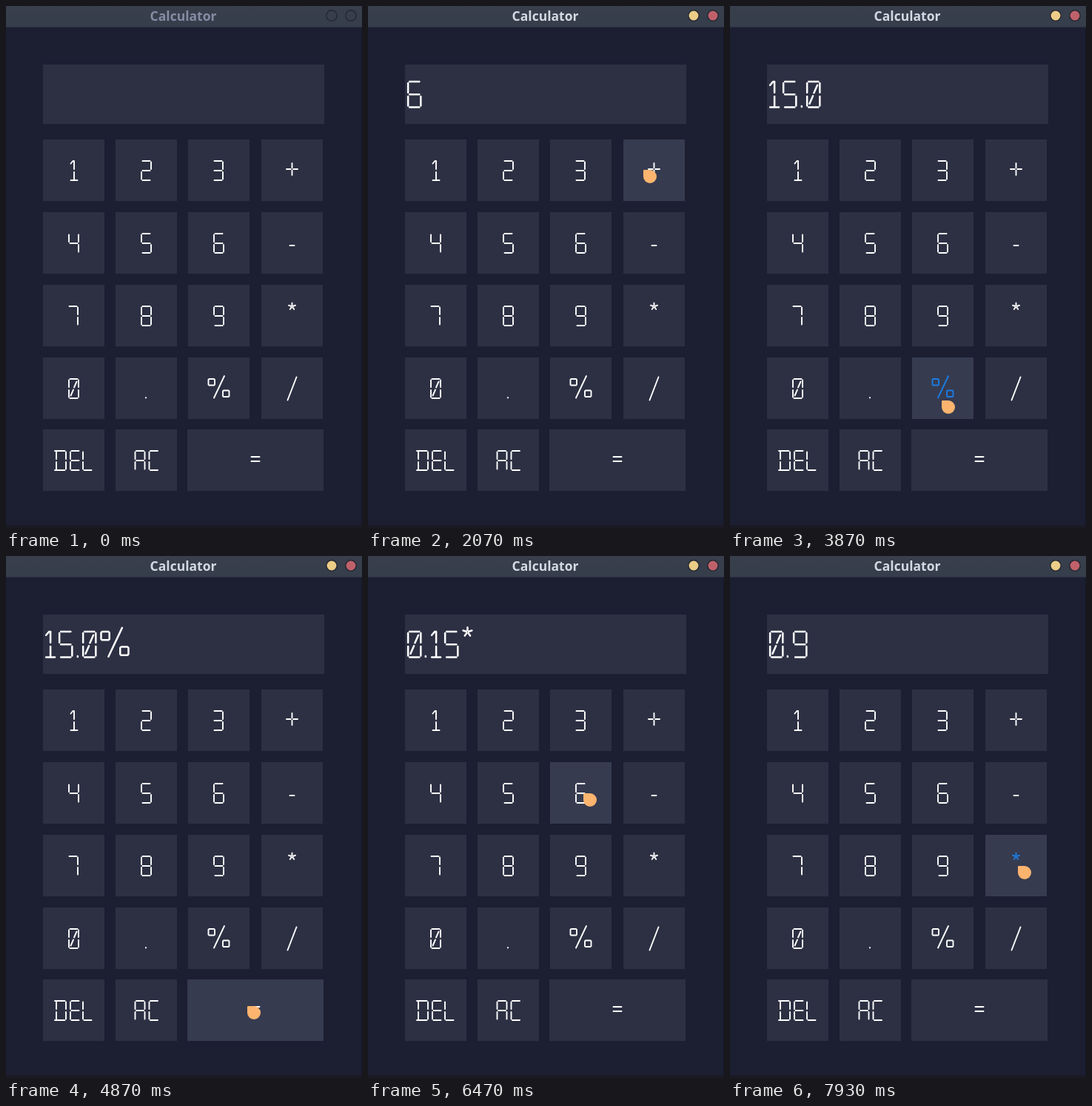
These frames come from a looping animation (481x704 px, 8000 ms). An HTML page with a canvas:

```html
<!DOCTYPE html>
<html lang="en">
<head>
<meta charset="utf-8">
<title>Calculator</title>
<style>
  html, body { margin: 0; width: 481px; height: 704px; overflow: hidden; background: #1c1e32; }
  canvas { display: block; }
</style>
</head>
<body>
<canvas id="stage" width="481" height="704"></canvas>
<script>
const ctx = document.getElementById('stage').getContext('2d');
const LOOP = 8000, FPS = 15;
const KEY_SIZE = 83, DISPLAY_SCALE = 1.32;

// Glyphs are centre lines on a cell 28 units high, x measured from the pen.
const SEGMENTS = {
  a: 'M4.5 1H14.5', b: 'M16 2.5V12', c: 'M16 16V25.5', d: 'M4.5 27H14.5',
  e: 'M3 16V25.5', f: 'M3 2.5V12', g: 'M4.5 14H14.5'
};
const glyphs = {};
function addGlyph(ch, advance, path, shift = 0) {
  const shifted = new Path2D();
  shifted.addPath(new Path2D(path), new DOMMatrix().translate(shift, 0));
  glyphs[ch] = { advance, path: shifted };
}
const segmented = {
  0: 'abcdef', 2: 'abged', 3: 'abgcd', 4: 'fgbc', 5: 'afgcd', 6: 'afgcde', 7: 'abc',
  8: 'abcdefg', 9: 'abcdfg', D: 'abcdef', E: 'adefg', L: 'def', A: 'abcefg', C: 'adef'
};
const extras = { 0: 'M5.5 23.5L9 15.5M10 12.5L13.5 4.5', D: 'M1 1H4.5M1 27H4.5' };
for (const [ch, parts] of Object.entries(segmented)) {
  // A glyph with one open side has a narrower cell.
  const openLeft = '37'.includes(ch), openRight = 'ELC'.includes(ch);
  const path = [...parts].map(p => SEGMENTS[p]).join('') + (extras[ch] || '');
  addGlyph(ch, openLeft || openRight ? 17 : 19, path, openLeft ? -2 : 0);
}
const arms = [0, 1, 2, 3, 4].map(i => {
  const s = Math.sin(i * Math.PI * 0.4), c = Math.cos(i * Math.PI * 0.4);
  return `M${7 + 1.4 * s} ${1.2 - 1.4 * c}L${7 + 4.7 * s} ${1.2 - 4.7 * c}`;
}).join('');
const ring = (x, y) => `M${x + 1} ${y}h6.5l1 1v6.5l-1 1h-6.5l-1 -1v-6.5z`;
addGlyph('1', 14, 'M3 4.5L6 1H7.5V12M7.5 16V27M3 27H12');
addGlyph('.', 5, 'M2 26V26.6');
addGlyph('+', 19, 'M2 12H7.8M11.2 12H17M9.5 4V10.3M9.5 13.7V20');
addGlyph('-', 10, 'M2 17H8');
addGlyph('*', 14, arms);
addGlyph('/', 17, 'M2.5 29.5L14.5 -1.5');
addGlyph('=', 17, 'M3 9H14M3 15H14');
addGlyph('%', 33, ring(2.5, 1) + ring(22, 16.5) + 'M10 26.5L24 -3');

const keys = ['123+', '456-', '789*', '0.%/'].map(row => [...row])
  .concat([['DEL', 'AC', '=']])
  .flatMap((row, r) => row.map((label, c) => ({
    label, x: Math.round(50 + 98.2 * c), y: Math.round(180 + 97.85 * r), w: KEY_SIZE
  })));
Object.assign(keys.find(k => k.label === '='), { x: 245, w: 184 });

// Pointer stops in ticks of 1/15 s: place, press, release, readout update.
const TRAVEL = 6;
const stop = (x, y, press, key = '', release = press, shown = press) =>
  ({ x, y, press, key, release, shown });
const stops = [
  stop(448, 212, 4),
  stop(290, 316, 14),
  stop(295, 301, 17, '6', 21, 24),
  stop(372, 221, 26, '+', 31, 33),
  stop(290, 425, 38, '9', 40, 41),
  stop(300, 594, 44, '=', 49, 50),
  stop(326, 611, 52),
  stop(286, 532, 58, '%', 67, 68),
  stop(326, 607, 72, '=', 73, 75),
  stop(384, 422, 85, '*', 88, 90),
  stop(291, 320, 95, '6', 97, 98),
  stop(330, 695, 104),
  stop(332, 612, 110, '=', 112, 113),
  stop(389, 418, 119, '*', 121, 122)
];
stops.forEach((s, i) => s.depart = i ? Math.max(stops[i - 1].shown, s.press - TRAVEL) : s.press);

function pointerAt(tick) {
  const i = stops.filter(s => s.depart <= tick).length - 1;
  if (i < 0) return null;
  const to = stops[i], from = stops[i - 1] || to;
  const k = Math.min(1, (tick - to.depart) / Math.max(1, to.press - 1 - to.depart));
  const eased = 1 - (1 - k) ** 2;
  return {
    x: Math.round(from.x + (to.x - from.x) * eased),
    y: Math.round(from.y + (to.y - from.y) * eased)
  };
}

// The window takes focus once the pointer has stayed inside for three ticks.
function hasFocus(tick) {
  return [0, 1, 2].every(ago => {
    const p = pointerAt(tick - ago);
    return p && p.y < 690;
  });
}

function evaluate(expression) {
  const [, a, op, b] = expression.match(/^([\d.]+)([+*%])([\d.]*)$/);
  const value = op === '%' ? a / 100 : op === '*' ? a * b : +a + +b;
  return Number.isInteger(value) ? value.toFixed(1) : String(+value.toFixed(8));
}

function readoutAt(tick) {
  return stops.filter(s => s.shown <= tick)
    .reduce((text, { key }) => key === '=' ? evaluate(text) : text + key, '');
}

function box(x, y, w, h, color) {
  ctx.fillStyle = color;
  ctx.fillRect(x, y, w, h);
}

function drawGlyphs(text, x, y, scale, color) {
  let pen = 0;
  for (const ch of text) {
    ctx.save();
    ctx.translate(x + Math.round(pen), y);
    ctx.scale(scale, scale);
    ctx.strokeStyle = color;
    ctx.lineWidth = 1.9;
    ctx.lineCap = ctx.lineJoin = 'round';
    ctx.stroke(glyphs[ch].path);
    ctx.restore();
    pen += glyphs[ch].advance * scale;
  }
}

function drawWindow(active) {
  box(0, 0, 481, 704, '#1c1e32');
  const bar = ctx.createLinearGradient(0, 0, 0, 28);
  bar.addColorStop(0, '#393f4c');
  bar.addColorStop(1, '#363e4b');
  box(0, 0, 481, 28, bar);
  box(0, 28, 481, 1, '#2a2f3e');
  box(480, 29, 1, 675, '#171929');
  box(0, 700, 481, 4, '#1b1923');
  ctx.fillStyle = active ? '#d3dae3' : '#868ca5';
  ctx.font = 'bold 17.5px "Noto Sans", "Open Sans", sans-serif';
  ctx.textAlign = 'center';
  ctx.fillText('Calculator', 239.5, 20);
  [[440, '#eccd87'], [466, '#bf616a']].forEach(([x, color]) => {
    ctx.beginPath();
    ctx.arc(x, 13, 7.2, 0, 2 * Math.PI);
    if (active) {
      ctx.fillStyle = color;
      ctx.fill();
    }
    ctx.strokeStyle = '#242832';
    ctx.lineWidth = 1.5;
    ctx.stroke();
  });
}

function drawKey({ label, x, y, w }, hovered, pressed) {
  box(x, y, w, KEY_SIZE, hovered ? '#363b50' : '#2d3043');
  const width = [...label].reduce((sum, ch) => sum + glyphs[ch].advance, 0);
  drawGlyphs(label, x + (w - width) / 2, y + 28, 1, hovered && pressed ? '#1c7ce0' : '#fff');
}

function drawPointer({ x, y }) {
  ctx.fillStyle = '#fdb46f';
  ctx.beginPath();
  ctx.roundRect(x, y, 18, 18, [1, 9, 9, 9]);
  ctx.fill();
}

function render(tick) {
  const pointer = pointerAt(tick);
  const isOver = k => pointer && pointer.x >= k.x && pointer.x < k.x + k.w &&
    pointer.y >= k.y && pointer.y < k.y + KEY_SIZE;
  const pressed = stops.some(s => tick >= s.press && tick < s.release);
  drawWindow(hasFocus(tick));
  box(50, 79, 380, 80, '#2d3043');
  drawGlyphs(readoutAt(tick), 50.2, 100.8, DISPLAY_SCALE, '#fff');
  for (const key of keys) drawKey(key, isOver(key), pressed);
  if (pointer) drawPointer(pointer);
}

const start = performance.now();
function loop() {
  const t = (performance.now() - start) % LOOP;
  render(Math.min(LOOP / 1000 * FPS - 1, Math.floor((t + 3.4) * FPS / 1000)));
  requestAnimationFrame(loop);
}
loop();
</script>
</body>
</html>
```
